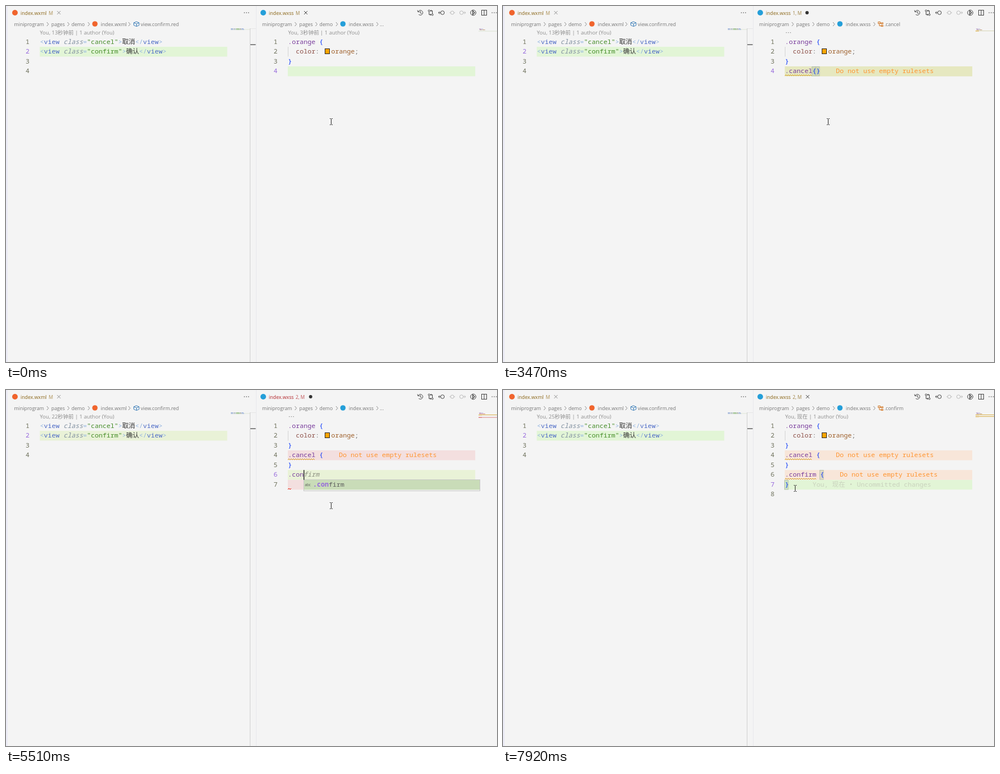
Write an HTML page with a canvas that moves like this. It is 878 px wide and 637 px high and loops after 8 s.

```html
<!DOCTYPE html>
<html lang="zh">
<head>
<meta charset="utf-8">
<title>Two editor panes</title>
<style>
html, body { margin: 0; width: 100%; height: 100%; overflow: hidden; background: #f4f4f4; }
canvas { display: block; }
</style>
</head>
<body>
<canvas id="stage" width="878" height="637"></canvas>
<script>
const ctx = document.getElementById('stage').getContext('2d');
const LOOP = 8000, CW = 7, PITCH = 17.55;
const CJK = '"Noto Sans CJK SC", "Noto Sans CJK"';
const MONO = `11.667px "Noto Sans Mono", ${CJK}, monospace`;
const ui = size => `${size}px "Open Sans", ${CJK}, sans-serif`;
const C = {
  bg: '#f4f4f4', green: '#e2f5d6', pale: '#e9f2d7', olive: '#e6e8c0',
  brown: '#8a6516', red: '#b3262b', error: '#e45454', warn: '#ff942f',
  gray: '#767676', icon: '#424242', punct: '#91b3e0', tag: '#4b69c6',
  attr: '#8190a0', string: '#448c27', selector: '#7a3e9d', brace: '#0431fa',
  value: '#9c5d27', ghost: '#8c8f80', focus: '#9769dc'
};
const LEFT = 60.8, RIGHT = 504.3;
const rowTop = n => 55.4 + PITCH * (n - 1);
const baseline = n => Math.round(67.55 + PITCH * (n - 1));

// ---- Timeline: each step overrides part of the state before it ----
const css = ['.orange {', '  color: orange;', '}'];
const EMPTY = 'Do not use empty rulesets';
const saved = [...css, '.cancel {', '}'];
const done = [...saved, '.confirm {', '}', ''];
const warn4 = bg => ({ line: 4, text: EMPTY, color: C.warn, bg, wave: [0, 7] });
const fail = (line, text, bg, wave) => ({ line, text, color: C.error, bg, wave });
const PINK = '#f3dfdf', PEACH = '#f8e6d9';
const warn6 = bg => ({ line: 6, text: EMPTY, color: C.warn, bg, wave: [0, 8] });
const typed = (text, ghost, items) => ({
  lines: [...saved, text, ''], caret: [6, text.length], ghost,
  popup: { typed: text.length, items }
});
const steps = [
  [0, { lines: [...css, ''], cur: 4, curBg: C.green, leftBg: C.green, caret: null,
    status: 'M', tab: C.brown, dirty: false, crumb: '', ago: '13秒钟前', lens: '3秒钟前',
    problems: [], brackets: [], ghost: '', popup: null, blame: '', mouse: [582, 207] }],
  [90, { caret: [4, 0] }],
  [540, { caret: null }],
  [1080, { caret: [4, 0] }],
  [1350, { lines: [...css, '.'], caret: [4, 1], dirty: true, lens: '' }],
  [1440, { ghost: 'cancel', leftBg: '#e3f3df', curBg: '#e6eac8', status: '1, M', tab: C.red,
    popup: { typed: 1, items: ['.cancel', '.confirm', '*.orange'] },
    problems: [fail(4, 'identifier expected', '#e6eac8', [6.4, 7.5])] }],
  [1730, { crumb: '.' }],
  [1920, { caret: null }],
  [2380, { caret: [4, 1] }],
  [2650, { lines: [...css, '.cancel'], caret: [4, 7], ghost: '', popup: null, crumb: '.cancel',
    problems: [fail(4, '{ expected', '#e6eac8', [6, 7])] }],
  [2920, { lines: [...css, '.cancel{}'], caret: [4, 8], brackets: [[4, 7], [4, 8]] }],
  [3010, { curBg: C.olive, leftBg: C.green, tab: C.brown, problems: [warn4(C.olive)] }],
  [3470, { caret: null }],
  [3740, { lines: [...saved, ''], cur: 5, curBg: C.pale, leftBg: C.pale, caret: [5, 1], dirty: false,
    brackets: [[4, 8], [5, 0]], problems: [warn4('#f5e8e4')] }],
  [4190, { caret: null, ago: '22秒钟前' }],
  [4280, { lens: '1秒钟前' }],
  [4370, { blame: '1秒钟前' }],
  [4660, { lines: [...saved, '', ''], cur: 6, caret: [6, 0], dirty: true, lens: '', blame: '', brackets: [] }],
  [5020, { crumb: '' }],
  [5200, { ...typed('.', 'cancel', ['.cancel', '.confirm', '*.cancel', '*.orange']),
    status: '2, M', tab: C.red,
    problems: [warn4(PINK), fail(7, 'identifier expected', PINK, [0, 1])] }],
  [5290, typed('.c', 'ancel', ['.cancel', '.confirm', '*.cancel'])],
  [5420, typed('.co', 'nfirm', ['.confirm'])],
  [5510, typed('.con', 'firm', ['.confirm'])],
  [5940, { lines: [...saved, '.confirm', ''], caret: [6, 8], ghost: '', popup: null,
    problems: [warn4(PINK), fail(7, '{ expected', PINK, [0, 1])] }],
  [6030, { crumb: '.confirm' }],
  [6300, { lines: [...saved, '.confirm{}', ''], caret: [6, 9], brackets: [[6, 8], [6, 9]] }],
  [6390, { curBg: C.olive, leftBg: C.green, tab: C.brown, problems: [warn4(PEACH), warn6(C.olive)] }],
  [6840, { caret: null }],
  [7110, { lines: done, cur: 7, curBg: C.green, caret: [7, 1], dirty: false,
    brackets: [[6, 9], [7, 0]], problems: [warn4(PEACH), warn6(PEACH)] }],
  [7560, { caret: null, ago: '25秒钟前' }],
  [7650, { lens: '现在', blame: '现在' }],
  [7920, { mouse: [523, 176] }]
];
const stateAt = t => Object.assign({}, ...steps.filter(s => s[0] <= t).map(s => s[1]));

// ---- Drawing helpers ----
function rect(x, y, w, h, color) {
  ctx.fillStyle = color;
  ctx.fillRect(x, y, w, h);
}
function text(str, x, y, color, font = MONO) {
  ctx.font = font;
  ctx.fillStyle = color;
  ctx.fillText(str, x, y);
  return x + ctx.measureText(str).width;
}
function line(color, width, ...paths) {
  ctx.strokeStyle = color;
  ctx.lineWidth = width;
  ctx.beginPath();
  for (const p of paths)
    for (let i = 0; i < p.length; i += 2) ctx[i ? 'lineTo' : 'moveTo'](p[i], p[i + 1]);
  ctx.stroke();
}
function disc(x, y, r, color) {
  ctx.fillStyle = color;
  ctx.beginPath();
  ctx.arc(x, y, r, 0, 7);
  ctx.fill();
}
function ring(x, y, r, color, from = 0, to = 2 * Math.PI) {
  ctx.strokeStyle = color;
  ctx.lineWidth = 1;
  ctx.beginPath();
  ctx.arc(x, y, r, from, to);
  ctx.stroke();
}
function frame(x, y, w, h, color) {
  ctx.strokeStyle = color;
  ctx.lineWidth = 1;
  ctx.strokeRect(x, y, w, h);
}
function runs(x, y, parts) {
  for (const [str, color, style] of parts) x = text(str, x, y, color, style ? `${style} ${MONO}` : MONO);
}
function wave(from, to, y, color) {
  const p = [];
  for (let x = from, i = 0; x <= to; x += 2, i++) p.push(x, y + (i % 2 ? -1 : 1));
  line(color, 1, p);
}
const cross = (x, y, color) => line(color, 1, [x - 3, y - 3, x + 3, y + 3], [x + 3, y - 3, x - 3, y + 3]);
const chevron = x => line('#8a8a8a', 1, [x - 1.5, 29, x + 1.5, 32.5, x - 1.5, 36]);
function dots(x) {
  for (let i = -1; i < 2; i++) disc(x + i * 3.7, 12, 0.8, C.icon);
}
function numbers(count, cur, right) {
  for (let n = 1; n <= count; n++) text(n, right - CW, baseline(n), n === cur ? C.focus : '#6d705b');
}

// ---- Shared chrome ----
function crumbs(x, file, color) {
  const put = (str, dx) => text(str, x + dx, 36, C.gray, ui(8.8));
  put('miniprogram', 0);
  put('pages', 66.5);
  put('demo', 102.5);
  put(file, 155);
  [60, 97, 133.5, 206].forEach(dx => chevron(x + dx));
  disc(x + 144.5, 32, 4.8, color);
}
function author(x, ago) {
  text(`You, ${ago} | 1 author (You)`, x, 51, '#8e8e8e', ui(9.5));
}
function toolbar() {
  const k = C.icon, faint = '#bcbcbc';
  ring(741, 12, 4.3, k, -2.6, 2.4);
  line(k, 1, [736, 7.5, 736.5, 10.5, 739.5, 10.5], [741, 9, 741, 12.5, 743.5, 13.5]);
  ring(756.5, 8.5, 1.5, k);
  ring(762.5, 15.5, 1.5, k);
  line(k, 1, [756.5, 10, 756.5, 15.5, 760, 15.5], [758.5, 13.8, 760.2, 15.5, 758.5, 17.2],
    [762.5, 14, 762.5, 8.5, 759, 8.5], [760.7, 6.8, 759, 8.5, 760.7, 10.2]);
  ring(780.5, 12, 3.3, k);
  line(k, 1, [777, 12, 773.5, 12], [775.5, 9.8, 773.3, 12, 775.5, 14.2]);
  ring(798, 12, 3, faint);
  line(faint, 1, [793, 12, 795, 12], [801, 12, 803, 12]);
  ring(814.5, 12, 3.2, faint);
  line(faint, 1, [817.7, 12, 822, 12], [819.6, 9.8, 821.8, 12, 819.6, 14.2]);
  ring(835.5, 12, 4.8, k);
  line(k, 1.2, [834.5, 7, 834.5, 17], [835, 9, 838, 12, 835, 15]);
  frame(850.5, 7.5, 9, 9, k);
  line(k, 1, [855, 7.5, 855, 16.5]);
  dots(873);
}
function miniText(x, y, widths, colors) {
  widths.forEach((w, i) => {
    rect(x, y, w, 1.2, colors[i % colors.length]);
    x += w + 0.7;
  });
}

// ---- Left pane ----
function leftPane(s) {
  disc(16, 12, 5, '#f0642d');
  text('index.wxml', 26, 15.5, C.brown, ui(8.8));
  text('M', 76.5, 15.5, '#a98b4d', ui(8.4));
  cross(94.5, 12, '#8f8f8f');
  dots(430);
  crumbs(14.5, 'index.wxml', '#f0642d');
  line('#3a7db8', 1, [228.5, 30, 233, 28, 238, 30, 238, 34.5, 233.5, 36.5, 228.5, 34.5, 228.5, 30],
    [228.5, 30, 233.5, 32, 238, 30], [233.5, 32, 233.5, 36.5]);
  text('view.confirm.red', 241, 36, C.gray, ui(8.8));

  author(60.5, s.ago);
  rect(60.4, rowTop(2), 335.2, PITCH, s.leftBg);
  numbers(4, 2, 42);
  [['cancel', '取消'], ['confirm', '确认']].forEach(([name, label], i) => runs(LEFT, baseline(i + 1), [
    ['<', C.punct], ['view', C.tag], [' class', C.attr, 'italic'], ['=', C.punct],
    [`"${name}"`, C.string], ['>', C.punct], [label, '#333333'],
    ['</', C.punct], ['view', C.tag], ['>', C.punct]
  ]));

  rect(402, 41.5, 34, 1, '#dfe8d6');
  const tints = ['#9db2dc', '#b5bfca', '#9cc08d', '#a5a5a5', '#9db2dc'];
  miniText(402, 40, [4, 4, 6, 2, 4], tints);
  miniText(402, 41.5, [4, 4, 7, 2, 4], tints);
  rect(436, 40, 1, 597, '#cfcfcf');
  rect(437, 40, 10, 1, '#e6e6e6');
  rect(437, 68.5, 9.5, 1.4, '#555555');
  rect(447, 0, 1, 637, '#e9e9ec');
}

// ---- Right pane ----
function cssLine(str, y) {
  let x = RIGHT;
  for (const part of str.match(/\.\w*|[{}]|color:|orange;|\s+/g) || []) {
    if (part === 'orange;') {
      rect(570, y - 9, 9, 10, '#ffa500');
      frame(570.5, y - 8.5, 8, 9, '#222222');
      x = 581.5;
      text('orange', x, y, C.value);
      text(';', x + 6 * CW, y, '#777777');
    } else if (part === 'color:') {
      text('color', x, y, '#8c4f47');
      text(':', x + 5 * CW, y, '#777777');
    } else {
      text(part, x, y, part[0] === '.' ? C.selector : C.brace);
    }
    x += part.length * CW;
  }
}
function symbolIcon(x) {
  const c = '#d0701a';
  frame(x - 4, 28.5, 3.5, 3, c);
  frame(x + 1.5, 30, 3, 2, c);
  frame(x + 1.5, 34.5, 3, 2, c);
  line(c, 1, [x - 2, 31.5, x - 2, 35.5, x + 1.5, 35.5], [x - 0.5, 31, x + 1.5, 31]);
}
function popup(s) {
  const { typed: n, items } = s.popup;
  const x = Math.round(RIGHT + n * CW), y = Math.floor(rowTop(s.cur + 1));
  const h = Math.round(items.length * PITCH + 3);
  rect(x, y, 316, h, C.bg);
  rect(x, y + 1, 315, PITCH, '#c9dcb8');
  frame(x + 0.5, y + 0.5, 315, h - 1, '#c8c8c8');
  items.forEach((item, i) => {
    const base = Math.round(y + 13.3 + i * PITCH), symbol = item[0] === '*';
    const word = symbol ? item.slice(1) : item;
    if (symbol) {
      [-8, -5, -2, 1].forEach((dy, k) => {
        rect(x + 3, base + dy, k % 2 ? 4 : 6, 1, '#777777');
        rect(x + (k % 2 ? 8 : 10), base + dy, k % 2 ? 5 : 3, 1, '#777777');
      });
    } else {
      text('abc', x + 2.5, base - 1, '#555555', ui(6.3));
    }
    const cut = n > 1 ? n : 0;
    text(word.slice(0, cut), x + 17, base, C.focus, `bold ${MONO}`);
    text(word.slice(cut), x + 17 + cut * CW, base, '#5b5b5b');
  });
}
function rightMinimap(s) {
  miniText(846, 40.5, [4, 1, 0.8], ['#b79ac9', '#8d9fe0']);
  miniText(847, 42, [4, 5], ['#bda49f', '#c9ac8c']);
  if (s.cur === 4 && !s.problems.length) rect(845, 44.5, 33, 1, '#dce3d4');
  for (const p of s.problems) {
    const y = 44 + (p.line - 4) * 1.5, color = p.color === C.warn ? '#d9ae45' : '#dc8585';
    rect(845, y, 33, 1, p.line === s.cur ? '#d8d5b5' : color);
    rect(845, y, 6, 1.3, color);
  }
  if (s.tab === C.red) rect(846, 42, 11, 1, '#d99a9a');
}
function rightPane(s) {
  disc(460, 12, 5, '#259fd9');
  text('index.wxss', 470, 15.5, s.tab, ui(8.8));
  ctx.globalAlpha = 0.8;
  text(s.status, 518, 15.5, s.tab, ui(8.2));
  ctx.globalAlpha = 1;
  const closeX = s.status === 'M' ? 536 : s.status[0] === '1' ? 543.7 : 544.7;
  if (s.dirty) disc(closeX, 12, 3, '#333333');
  else cross(closeX, 12, C.icon);
  toolbar();
  crumbs(458, 'index.wxss', '#259fd9');
  if (s.crumb) {
    symbolIcon(675);
    text(s.crumb, 682, 36, C.gray, ui(8.8));
  } else {
    text('...', 668.5, 36, C.gray, ui(8.8));
  }

  if (s.lens) author(504.5, s.lens);
  else for (let i = 0; i < 3; i++) rect(506 + i * 3.7, 47, 1.2, 1.2, '#777777');

  const band = (n, color) => rect(503.9, rowTop(n), 335.2, PITCH, color);
  band(s.cur, s.curBg);
  for (const p of s.problems) band(p.line, p.line === s.cur ? s.curBg : p.bg);
  for (const [n, col] of s.brackets) {
    const x = Math.round(RIGHT + col * CW) - 0.5, y = Math.round(rowTop(n)) + 0.5;
    rect(x, y, 6.5, 16.5, 'rgba(110,150,110,.18)');
    frame(x, y, 6.5, 16.5, '#b9c2ac');
  }
  rect(504, rowTop(2), 1, PITCH, '#d3d3d3');

  numbers(s.lines.length, s.cur, 485.5);
  s.lines.forEach((str, i) => cssLine(str, baseline(i + 1)));
  const width = s.lines[s.cur - 1].length;
  if (s.ghost) text(s.ghost, RIGHT + width * CW, baseline(s.cur), C.ghost, `italic ${MONO}`);
  for (const p of s.problems) {
    const len = s.lines[p.line - 1].length + (p.line === s.cur ? s.ghost.length : 0);
    text(p.text, RIGHT + (len + 4) * CW, baseline(p.line), p.color);
    wave(504 + p.wave[0] * CW, 504 + p.wave[1] * CW, baseline(p.line) + 4,
      p.color === C.warn ? '#d39a1c' : '#e51400');
  }
  if (s.blame) text(`You, ${s.blame} • Uncommitted changes`, 553.5, baseline(s.cur), '#c9d2bd');
  if (s.popup) popup(s);
  if (s.caret) {
    const [n, col] = s.caret;
    rect(Math.round(RIGHT + col * CW), rowTop(n), 1.5, PITCH, '#2c2c2c');
  }
  rightMinimap(s);
}
function mouse([x, y]) {
  line('#222222', 1, [x - 0.5, y - 4.5, x - 0.5, y + 4.5],
    [x - 3, y - 5.5, x - 1.5, y - 5.5, x - 0.5, y - 4.5, x + 0.5, y - 5.5, x + 2, y - 5.5],
    [x - 3, y + 5.5, x - 1.5, y + 5.5, x - 0.5, y + 4.5, x + 0.5, y + 5.5, x + 2, y + 5.5]);
}

function draw(now) {
  const s = stateAt(now % LOOP);
  rect(0, 0, 878, 637, C.bg);
  rect(0, 0, 3, 637, '#ececf6');
  leftPane(s);
  rightPane(s);
  mouse(s.mouse);
  requestAnimationFrame(draw);
}
draw(0);
</script>
</body>
</html>
```
